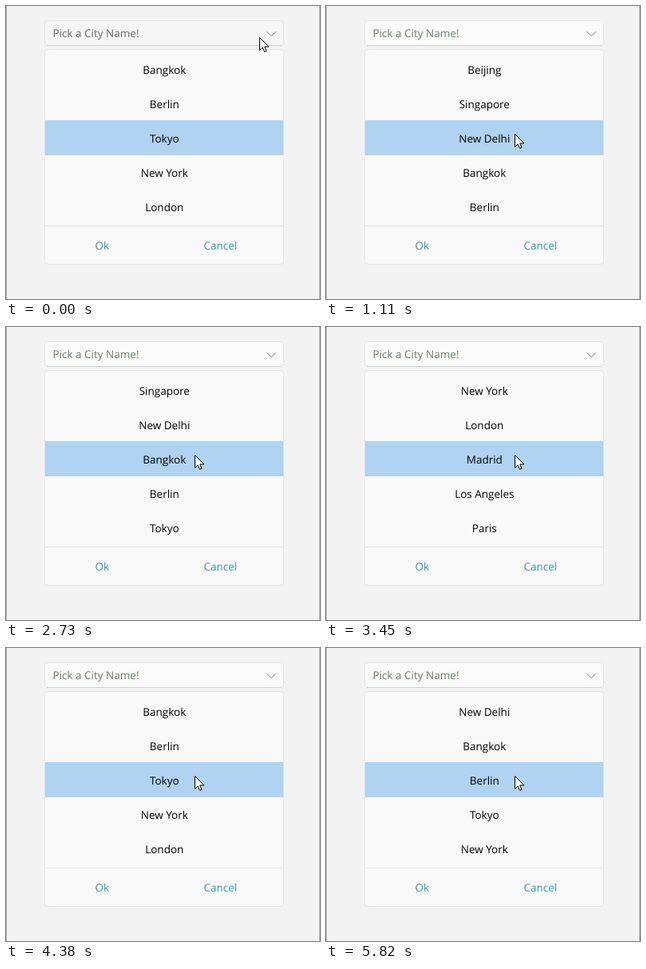
Recreate the animation shown at these times as an HTML page. Size 393 by 367 pixels, loop 6.03 s.

```html
<!DOCTYPE html>
<html lang="en">
<head>
<meta charset="utf-8">
<title>City picker</title>
<style>
  html, body { margin: 0; width: 100%; height: 100%; overflow: hidden; background: #f3f3f3; }
  svg { display: block; width: 393px; height: 367px; }
  text { font: 13.5px "Open Sans", "Noto Sans", sans-serif; text-rendering: geometricPrecision; }
  .mid { text-anchor: middle; fill: #000; }
  .link { text-anchor: middle; fill: #3390d8; }
  .box { fill: #f9f9f9; stroke: #e5e5e5; }
  #field { fill: #fbfbfb; }
  #hint { fill: #6a7a69; }
  .hover #field { fill: #f6f6f6; }
  .hover #hint { fill: #666; }
</style>
</head>
<body>
<svg id="stage" viewBox="0 0 393 367">
  <rect width="393" height="367" fill="#f3f3f3"/>
  <path d="M.5 0V367M392.5 0V367" stroke="#a3a3a3"/>

  <rect id="field" class="box" x="48.5" y="18.5" width="299" height="31" rx="4"/>
  <path d="M51 49.5H345" stroke="#cfcfcf"/>
  <text id="hint" x="58.5" y="39">Pick a City Name!</text>
  <path d="M326.5 32.2L332 37.7L337.5 32.2" fill="none" stroke="#777"/>

  <rect class="box" x="48.5" y="54.5" width="299" height="269" rx="4"/>
  <rect x="49" y="143" width="298" height="44" fill="#b0d3f1"/>
  <path d="M49 275.5H347" stroke="#e5e5e5"/>
  <g id="rows"></g>
  <text class="link" x="120.2" y="305">Ok</text>
  <text class="link" x="268.4" y="305">Cancel</text>

  <path id="cursor" d="M.5 .5V16.5L4.2 13L6.6 18.4L9 17.3L6.7 12H11.8Z"
        fill="#fff" stroke="#000" stroke-linejoin="round"/>
</svg>
<script>
  const LOOP = 6030, TICK = 30, ROWS = 5, START = 3;
  const cities = ["New Delhi", "Bangkok", "Berlin", "Tokyo", "New York", "London",
    "Madrid", "Los Angeles", "Paris", "Beijing", "Singapore"];

  // Wheel flicks: first notch, last notch, notches (negative turns back)
  const flicks = [
    [600, 690, 4], [1020, 1110, 4], [1320, 1410, -4], [1770, 1770, -1],
    [2040, 2040, 1], [2220, 2340, 2], [2490, 2820, 4], [3150, 3300, 3],
    [3450, 3660, 3], [4020, 4380, -5], [4530, 4650, 2], [5010, 5160, 2],
    [5340, 5430, 2], [5610, 5820, 4]
  ];

  const $ = id => document.getElementById(id);
  const rows = Array.from({ length: ROWS }, (_, i) => {
    const row = document.createElementNS("http://www.w3.org/2000/svg", "text");
    row.setAttribute("class", "mid");
    row.setAttribute("x", 198.3);
    row.setAttribute("y", 85 + i * 43);
    return $("rows").appendChild(row);
  });

  // Notches of one flick turned by time t, evenly spaced
  function turned(t, [from, to, notches]) {
    if (t < from) return 0;
    if (t >= to) return notches;
    const gap = (to - from) / (Math.abs(notches) - 1);
    return Math.sign(notches) * (1 + Math.floor((t - from) / gap));
  }

  function pointer(t) {
    const p = Math.min(1, t / 360);
    const e = p * p * (3 - 2 * p);
    const settle = t < 510 ? 3 : 0;
    return [317 + (233 + settle + 3 - 317 - 0) * e, 39 + 121 * e].map(Math.round);
  }

  function draw() {
    const t = Math.floor(performance.now() % LOOP / TICK) * TICK;
    const n = cities.length;
    const picked = flicks.reduce((sum, flick) => sum + turned(t, flick), START);
    rows.forEach((row, i) => {
      const name = cities[(picked + i - 2 + n) % n];
      if (row.textContent !== name) row.textContent = name;
    });
    const [x, y] = pointer(t);
    $("cursor").setAttribute("transform", `translate(${x},${y})`);
    $("stage").classList.toggle("hover", y < 50);
    requestAnimationFrame(draw);
  }
  draw();
</script>
</body>
</html>
```
